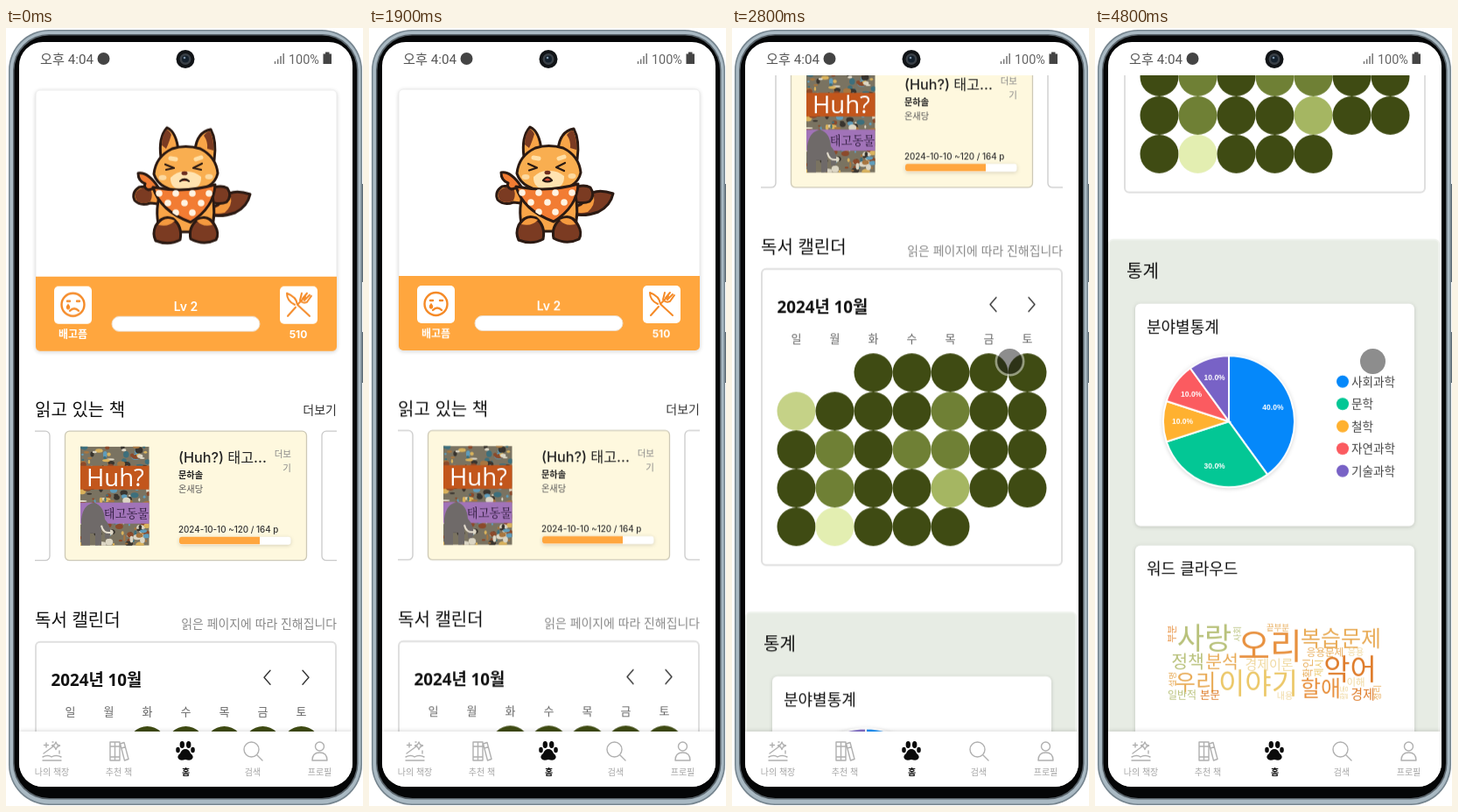
These frames come from a looping animation (408x888 px, 5000 ms). An HTML page:

```html
<!DOCTYPE html>
<html lang="ko">
<head>
<meta charset="utf-8">
<title>독서 앱</title>
<style>
html, body { margin: 0; width: 100%; height: 100%; overflow: hidden; background: #fff; }
svg { display: block; width: 408px; height: 888px; }
text { font-family: "Noto Sans CJK KR", "Noto Sans CJK", "Noto Sans CJK JP", sans-serif; white-space: pre; }
.latin { font-family: Inter, "Noto Sans CJK KR", "Noto Sans CJK", sans-serif; }
.status { font-family: Roboto, "Noto Sans CJK KR", "Noto Sans CJK", sans-serif; }
.arial { font-family: "Liberation Sans", Arial, sans-serif; }
.cover { font-family: "Open Sans", "Noto Sans CJK KR", "Noto Sans CJK", sans-serif; }
.serif { font-family: "Noto Serif CJK KR", "Noto Sans CJK KR", serif; }
.shadow { filter: drop-shadow(0 1px 2px rgba(0,0,0,.16)); }
.ink { stroke: #2b1a13; stroke-width: 3; stroke-linejoin: round; stroke-linecap: round; }
.line { fill: none; stroke-linecap: round; stroke-linejoin: round; }
#page, #touch, #head, .look { animation: 5s step-end infinite; }
#page { animation-name: scroll; }
#touch { animation-name: touch; }
#head { animation-name: nod; }
#frown { animation-name: frown; }
#squint { animation-name: squint; }
@keyframes scroll {
  0% { transform: translateY(.7px); }
  14% { transform: translateY(0); }
  44% { transform: translateY(-14px); }
  46% { transform: translateY(-109.5px); }
  48% { transform: translateY(-196px); }
  50% { transform: translateY(-213px); }
  52% { transform: translateY(-244px); }
  54% { transform: translateY(-372px); }
  56% { transform: translateY(-425px); }
  68% { transform: translateY(-441px); }
  70% { transform: translateY(-528px); }
  72% { transform: translateY(-616px); }
  74% { transform: translateY(-638px); }
  92% { transform: translateY(-668px); }
  94% { transform: translateY(-790px); }
  96%, 100% { transform: translateY(-850.5px); }
}
@keyframes touch { 0% { opacity: 0; } 42%, 100% { opacity: 1; } }
@keyframes nod {
  0% { transform: none; }
  6% { transform: translateY(.6px); }
  14% { transform: none; }
  18% { transform: translateY(.6px); }
  22%, 100% { transform: none; }
}
@keyframes frown { 0% { opacity: 1; } 8% { opacity: 0; } 18% { opacity: 1; } 20%, 100% { opacity: 0; } }
@keyframes squint { 0% { opacity: 0; } 8% { opacity: 1; } 18% { opacity: 0; } 20%, 100% { opacity: 1; } }
</style>
</head>
<body>
<svg viewBox="0 0 408 888">
  <defs>
    <clipPath id="view"><rect x="15" y="54" width="381" height="749"/></clipPath>
    <clipPath id="row"><rect x="33" y="455" width="345" height="160"/></clipPath>
    <clipPath id="art"><rect x="85" y="477" width="78.5" height="113"/></clipPath>
    <clipPath id="scarf"><path d="M168 181Q205 188 239 178Q238 204 211 221Q176 208 168 181Z"/></clipPath>
  </defs>

  <!-- phone body -->
  <path d="M407 178V290M407 347V405" stroke="#5f6d77" stroke-width="2"/>
  <rect x="3" y="2" width="404" height="885" rx="46" fill="#75848e"/>
  <rect x="4.5" y="3.500" width="401" height="882" rx="45" fill="#a9b9c3"/>
  <rect x="8" y="7" width="394.500" height="873.500" rx="41" fill="#59636a"/>
  <rect x="9.500" y="8.500" width="391.500" height="870.500" rx="40" fill="#050607"/>
  <rect x="15" y="16" width="381" height="850" rx="27" fill="#fff"/>

  <g clip-path="url(#view)">
    <g id="page">
      <!-- pet card -->
      <g class="shadow">
        <rect x="34" y="70" width="344" height="298" rx="5" fill="#fff" stroke="#ebebeb"/>
        <path d="M34 283H378V363a5 5 0 0 1-5 5H39a5 5 0 0 1-5-5Z" fill="#ffa63e"/>
      </g>
      <g id="pet">
        <path class="ink" d="M232 203Q244 204 249 193Q258 182 279 189Q276 203 262 210Q246 216 231 212Z" fill="#7b3b22"/>
        <path d="M235 205Q244 205 250 195L257 192Q259 202 250 210Q242 212 235 210Z" fill="#f59a3f"/>
        <path class="ink" d="M177 186Q163 178 152 181Q143 187 147 196Q154 203 165 199Q172 199 178 202Z" fill="#f59a3f"/>
        <path d="M164 181Q154 181 149 186Q146 192 150 197Q157 201 165 197Q169 189 164 181Z" fill="#7b3b22"/>
        <path class="ink" d="M232 184Q244 177 253 182Q259 191 252 198Q243 202 230 196Z" fill="#7b3b22"/>
        <path class="ink" d="M176 188Q169 213 177 232H234Q241 212 235 186Z" fill="#f9a548"/>
        <path class="ink" d="M171 225Q179 212 191 217Q202 226 199 241Q186 248 171 242Q167 234 171 225Z" fill="#7b3b22"/>
        <path class="ink" d="M239 225Q232 212 220 217Q208 226 211 240Q226 248 240 241Q244 234 239 225Z" fill="#7b3b22"/>
        <path d="M174 224Q181 213 193 219Q186 227 174 224ZM236 224Q230 213 218 219Q224 227 236 224Z" fill="#f59a3f"/>
        <g id="head">
          <path class="ink" d="M177 147Q174 124 184 113Q195 118 197 140ZM216 139Q218 118 234 115Q241 128 238 150Z" fill="#f9a548"/>
          <path d="M178 133Q178 121 184 115Q187 117 189 121Q186 131 183 137ZM226 122Q230 117 233 117Q238 126 237 139L230 137Q231 129 226 122Z" fill="#7b3b22"/>
          <path class="ink" d="M169 166Q171 146 190 137Q205 132 222 137Q240 146 242 165Q238 184 207 187Q175 185 169 166Z" fill="#f9ae50"/>
          <path d="M188 170Q196 162 205 163Q215 162 223 169Q224 183 206 185Q187 184 188 170Z" fill="#ffe3b0"/>
          <path d="M188 148l6 1M217 149l6-2" stroke="#ffdfa6" stroke-width="5" stroke-linecap="round"/>
          <ellipse cx="179" cy="170" rx="4.500" ry="3" fill="#fcd9a0"/><ellipse cx="232" cy="169" rx="4.500" ry="3" fill="#fcd9a0"/>
          <ellipse cx="204" cy="165" rx="3.5" ry="2.3" fill="#6b2d20"/>
          <g id="frown" class="look line" stroke="#2b1a13" stroke-width="2.200">
            <path d="M182 155l10 4l-9 2M224 154l-10 5l9 2"/>
            <path d="M199 174q5-4 10 0" fill="#cf4a35"/>
          </g>
          <g id="squint" class="look line" stroke="#2b1a13" stroke-width="2.200">
            <path d="M182 155l10 4.500l-9 3M224 154l-10 5l9 4"/>
            <path d="M199 174q5-7 10 0q-5 3-10 0Z" fill="#cf4a35"/>
          </g>
        </g>
        <path class="ink" d="M174 181Q162 163 151 165Q151 174 159 177Q157 182 163 184Z" fill="#f27c33"/>
        <path class="ink" d="M168 181Q205 188 239 178Q238 204 211 221Q176 208 168 181Z" fill="#f27c33"/>
        <g id="dots" clip-path="url(#scarf)" fill="#fff3e2"></g>
      </g>
      <g fill="#fff">
        <rect x="55" y="294" width="43" height="43" rx="5"/>
        <rect x="313" y="294" width="43" height="43" rx="5"/>
        <rect x="121" y="328.5" width="169" height="17" rx="8.5" stroke="#ecdcca"/>
      </g>
      <g class="line" stroke="#f58a27" stroke-width="2.4">
        <circle cx="76.5" cy="315" r="13"/>
        <path d="M70 311h3M81 311h3M73 322q5-5 10 0" />
        <path d="M71 315q-3 4 0 5q3-1 0-5" fill="#f58a27" stroke-width="1.5"/>
        <path d="M321 302Q332 306 333 315L347 328M321 302Q321 311 330 315M331 318L322 328M333 315L342 306M338 302l-2 8q3 4 8 2l5-7M344 302l-5 6M347 304l-6 6" stroke-width="2"/>
      </g>

      <!-- current book -->
      <g clip-path="url(#row)" stroke="#c9c9c9" stroke-width="1.3" fill="#fff">
        <rect x="-100" y="459.5" width="150" height="147.5" rx="5"/>
        <rect x="361" y="459.5" width="150" height="147.5" rx="5"/>
        <rect x="67.5" y="459.5" width="276" height="147.5" rx="5" fill="#fef8de" stroke="#cdc9b6"/>
      </g>
      <g clip-path="url(#art)">
        <rect x="85" y="477" width="79" height="113" fill="#7a7361"/>
        <g id="blots"></g>
        <rect x="85" y="499" width="79" height="27" fill="#c2561c"/>
        <rect x="85" y="541" width="79" height="24" fill="#a173b8"/>
        <path d="M86 590V560Q88 543 101 541Q112 545 113 560Q122 570 118 582H113Q114 570 109 569V590H102V576H96V590Z" fill="#6f6a69"/>
        <path d="M109 567q2 10 11 8" fill="none" stroke="#e6dfd0" stroke-width="2"/>
      </g>
      <g class="shadow"><rect x="198" y="580" width="127.5" height="9" rx="3" fill="#fff"/></g>
      <path d="M290 580H201a3 3 0 0 0-3 3v2.500a3 3 0 0 0 3 3H290Z" fill="#ffa63e"/>

      <!-- calendar -->
      <rect x="34" y="700" width="343" height="338" rx="5" fill="#fff" stroke="#dfdfdf" stroke-width="2"/>
      <path class="line" d="M302 732.5l-7 8l7 8M339 732.5l7 8l-7 8" stroke="#333" stroke-width="1.4"/>
      <g id="days"></g>

      <!-- statistics -->
      <rect x="16" y="1092" width="377" height="700" rx="5" fill="#e7ece4" stroke="#f0f3ee" stroke-width="2"/>
      <g class="shadow" fill="#fff">
        <rect x="46" y="1165" width="319" height="254" rx="6"/>
        <rect x="46" y="1441" width="319" height="254" rx="6"/>
      </g>
      <g id="pie" class="shadow"></g>
      <g id="labels"></g>
    </g>
  </g>

  <!-- status bar -->
  <circle cx="111.5" cy="35" r="7" fill="#444"/>
  <circle cx="205" cy="35.5" r="10.5" fill="#111417"/>
  <circle cx="205" cy="35.5" r="6.5" fill="#3a4047"/>
  <circle cx="205" cy="35.5" r="4" fill="#14202c"/>
  <circle cx="204" cy="34" r="1.3" fill="#7d94a8"/>
  <path d="M307.5 41v-3M310.7 41v-5.5M314 41v-9M317.2 41v-12" stroke="#777" stroke-width="1.5"/>
  <path d="M365 27.5h4.5v2h2.5V41h-9.500V29.500h2.500Z" fill="#444"/>

  <!-- tab bar -->
  <path d="M15 803H396V839a27 27 0 0 1-27 27H42a27 27 0 0 1-27-27Z" fill="#fff" style="filter:drop-shadow(0 -1px 2px rgba(0,0,0,.14))"/>
  <g class="line" stroke="#b0b0b0" stroke-width="1.4">
    <path d="M42 836h21M42 832q6-3 10 0q5-3 11 0M43 828L54 820M46 816v5M43.500 818.500h5M57 815l1.500 3l3 1l-3 1.500l-1.500 3l-1.500-3l-3-1.500l3-1ZM61 825v3M53 815h1"/>
    <path d="M119 815h5.500v21H119ZM124.500 815h5.500v21h-5.500ZM130.500 817l4.500-1.500l5 19l-4.500 1.500ZM119 820h11M119 832h11M132 822l4.500-1.300"/>
    <circle cx="280.500" cy="823.500" r="8.500"/><path d="M287 830l6 6"/>
    <circle cx="358.500" cy="820" r="5"/><path d="M350 836q0-9 8.500-9t8.500 9Z"/>
  </g>
  <g fill="#0b0b0b">
    <path d="M205 823q4 0 6 5q4 3 2 6q-2 3-8 1q-6 2-8-1q-2-3 2-6q2-5 6-5Z"/>
    <ellipse cx="201.300" cy="818" rx="2.700" ry="3.900"/><ellipse cx="208.700" cy="818" rx="2.700" ry="3.900"/>
    <ellipse cx="196.500" cy="824" rx="2.300" ry="3.300"/><ellipse cx="213.500" cy="824" rx="2.300" ry="3.300"/>
  </g>
  <g id="chrome"></g>

  <g id="touch">
    <circle cx="317.500" cy="380.500" r="15.500" fill="none" stroke="#fff" stroke-opacity=".45" stroke-width="3"/>
    <circle cx="317.500" cy="380.500" r="14.500" fill="#1c1c1c" fill-opacity=".5"/>
  </g>
</svg>
<script>
const $ = id => document.getElementById(id);

function add(parent, tag, attrs, content) {
  const el = document.createElementNS('http://www.w3.org/2000/svg', tag);
  for (const k in attrs) el.setAttribute(k, attrs[k]);
  if (content) el.textContent = content;
  parent.appendChild(el);
  return el;
}

// y is the vertical middle of the line
function label(parent, str, x, y, size, fill, weight = 400, anchor = 'start', cls = '') {
  return add(parent, 'text', {
    x, y: y + size * .37, 'font-size': size, fill, 'font-weight': weight, 'text-anchor': anchor, class: cls
  }, str);
}

const page = $('labels'), chrome = $('chrome');

// pet card
label(page, 'Lv 2', 205.5, 317, 14, '#fff', 600, 'middle', 'latin');
label(page, '배고픔', 76.5, 349, 12, '#fff', 700, 'middle');
label(page, '510', 334, 349, 12, '#fff', 700, 'middle', 'latin');
for (let i = 0; i < 12; i++) {
  const r = i / 4 | 0;
  add($('dots'), 'circle', { cx: 175 + i % 4 * 19 + r % 2 * 10, cy: 188 + r * 11, r: 3.8 });
}

// current book
label(page, '읽고 있는 책', 33, 435, 20, '#111');
label(page, '더보기', 378, 435, 14, '#333', 400, 'end');
label(page, '(Huh?) 태고...', 197, 489.5, 16.2, '#222', 500, 'start', 'latin');
label(page, '더보', 326, 485, 10.5, '#888', 400, 'end');
label(page, '기', 326, 501, 10.5, '#888', 400, 'end');
label(page, '문하솔', 197, 510, 10.2, '#222', 600);
label(page, '온새당', 197, 526, 10.2, '#555');
label(page, '2024-10-10 ~120 / 164 p', 197, 571.5, 9.8, '#333', 500, 'start', 'latin');
label(page, 'Huh?', 125, 512, 27.5, '#fff', 400, 'middle', 'cover');
label(page, '태고동물', 137.5, 553, 13.3, '#2c1a3a', 500, 'middle', 'serif');

let seed = 7;
const rnd = () => (seed = seed * 16807 % 2147483647) / 2147483647;
const tones = ['#3d6f7c', '#a8763f', '#d9b25c', '#38342e', '#5f9cba', '#8b4a2b', '#dcd6c4'];
for (let i = 0; i < 220; i++) {
  add($('blots'), 'ellipse', {
    cx: 85 + rnd() * 79, cy: 477 + rnd() * 113, rx: 1 + rnd() * 4, ry: 1 + rnd() * 3,
    fill: tones[rnd() * 7 | 0]
  });
}

// calendar: one digit per day, 0 empty, 1 dark to 5 pale
label(page, '독서 캘린더', 33, 675, 20, '#111');
label(page, '읽은 페이지에 따라 진해집니다', 378, 679, 13.9, '#888', 400, 'end');
label(page, '2024년 10월', 51.5, 743.5, 18.8, '#111', 700, 'start', 'cover');
const greens = ['', '#3f4b13', '#6f8035', '#a5b662', '#c5d287', '#e3eeb1'];
[...'일월화수목금토'].forEach((d, i) => label(page, d, 73.5 + i * 44, 780, 13, '#666', 400, 'middle'));
['0011111', '4111211', '1212211', '1211311', '1511100'].forEach((week, r) =>
  [...week].forEach((v, c) => {
    if (+v) add($('days'), 'circle', { cx: 73.5 + c * 44, cy: 818.3 + r * 44, r: 22, fill: greens[v] });
  }));

// pie chart
label(page, '통계', 36, 1128, 20, '#111', 500);
label(page, '분야별통계', 59, 1191.5, 18, '#111');
const cx = 153, cy = 1299.5, R = 75;
const at = (turn, r) => {
  const a = turn * 2 * Math.PI;
  return [cx + r * Math.sin(a), cy - r * Math.cos(a)];
};
let from = 0;
[['사회과학', 40, '#0588fa'], ['문학', 30, '#03c795'], ['철학', 10, '#ffb130'],
 ['자연과학', 10, '#fb5b60'], ['기술과학', 10, '#7862c6']].forEach(([name, pct, fill], i) => {
  const to = from + pct / 100, y = 1254 + i * 25.5;
  add($('pie'), 'path', {
    d: `M${cx} ${cy}L${at(from, R)}A${R} ${R} 0 0 1 ${at(to, R)}Z`,
    fill, stroke: '#fff', 'stroke-width': 2
  });
  const [x, ly] = at((from + to) / 2, 53);
  label(page, pct + '.0%', x, ly, 8.5, '#fff', 700, 'middle', 'arial');
  add(page, 'circle', { cx: 283, cy: y, r: 7, fill });
  label(page, name, 293, y, 13.6, '#444');
  from = to;
});

// word cloud: word, middle x, middle y, size, colour, upright
label(page, '워드 클라우드', 59, 1467.5, 18, '#111');
const warm = ['#e8913f', '#b9c27c', '#e9ac58', '#df7d2c', '#ecc869', '#f0d9a0'];
[['오리', 200, 706, 40, 0], ['사랑', 125, 697, 34, 1], ['복습문제', 281, 697, 25, 2],
 ['악어', 291.5, 732, 33, 3], ['우리', 115, 747, 25.5, 2], ['이야기', 186.5, 748, 33, 4],
 ['정책', 106, 724, 20.5, 1], ['분석', 145, 724, 20.5, 2], ['경제이론', 199, 727, 15, 5],
 ['할애', 258, 754, 25, 0], ['경제', 306, 761, 15, 3], ['이해', 298, 747, 11.5, 5],
 ['일반적', 99.5, 762, 12, 1], ['본문', 131.5, 762, 12.5, 3], ['내용', 217, 763, 10, 5],
 ['끝부분', 209, 685, 9.5, 2], ['응용문제', 263, 713, 11.5, 2], ['응용', 298, 713, 10, 5],
 ['부분', 88, 692, 11, 0, 1], ['사회', 162, 692, 9.5, 1, 1], ['설명', 88, 744, 9.5, 2, 1],
 ['확인', 244, 731, 12, 2, 1], ['제시', 256, 731, 11, 4, 1], ['활동', 285, 759, 9, 5, 1],
 ['정리', 322, 759, 9.5, 2, 1]].forEach(([word, x, y, size, tone, upright]) => {
  const el = label(page, word, x, y + 850, size, warm[tone], 400, 'middle');
  if (upright) el.setAttribute('transform', `rotate(-90 ${x} ${y + 850})`);
});

// fixed labels
label(chrome, '오후 4:04', 39, 35, 15.2, '#555', 400, 'start', 'status');
label(chrome, '100%', 358, 35.5, 14.5, '#666', 400, 'end', 'status');
['나의 책장', '추천 책', '홈', '검색', '프로필'].forEach((name, i) =>
  label(chrome, name, 52.5 + i * 76.5, 849, 10, i === 2 ? '#111' : '#a5a5a5', i === 2 ? 700 : 400, 'middle'));
</script>
</body>
</html>
```
